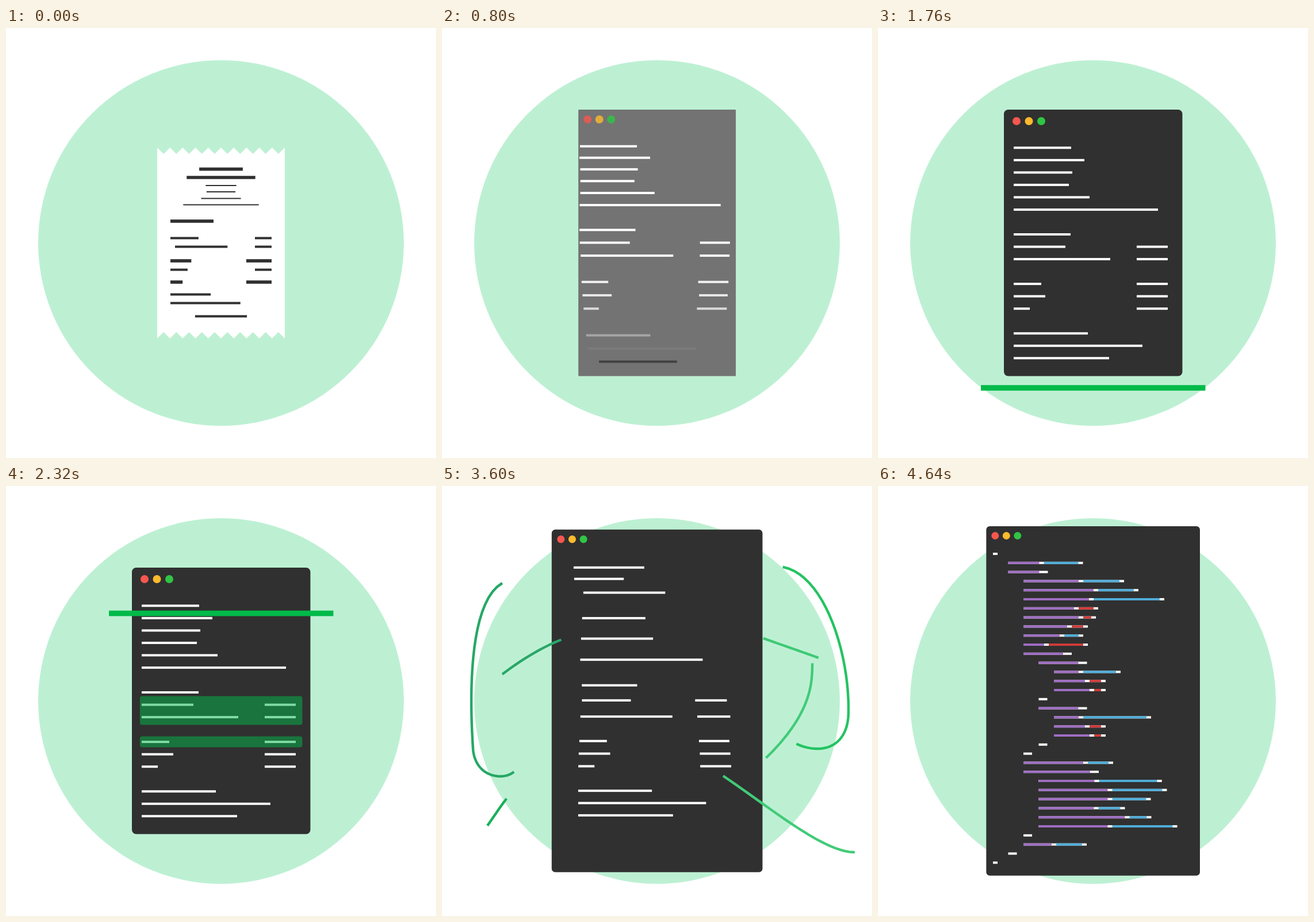
Recreate the animation shown at these times as an HTML page. Size 748 by 748 pixels, loop 5520 ms.

```html
<!DOCTYPE html>
<html lang="en">
<head>
<meta charset="utf-8">
<title>Receipt to code</title>
<style>
  html, body { margin: 0; width: 100%; height: 100%; overflow: hidden; background: #fff; }
  svg { display: block; width: 100vw; height: 100vh; }
</style>
</head>
<body>
<svg id="stage" viewBox="0 0 748 748"></svg>
<script>
const LOOP = 5520, STEP = 80;
const DARK = [48, 48, 48], WHITE = [255, 255, 255], GREEN = [2, 186, 74];
const PURPLE = [158, 109, 194], BLUE = [79, 172, 216], RED = [208, 58, 58];
const DOTS = ['#f4574f', '#fdba2d', '#30c544'];

const lerp = (a, b, p) => a + (b - a) * p;
const mix = (a, b, p) => a.map((v, i) => lerp(v, b[i], p));
const ramp = (t, a, b) => Math.min(1, Math.max(0, (t - a) / (b - a)));
const sine = p => (1 - Math.cos(Math.PI * p)) / 2;
const cubic = p => p < .5 ? 4 * p ** 3 : 1 - 4 * (1 - p) ** 3;
const rgb = c => `rgb(${c.map(Math.round)})`;
const n = v => v.toFixed(2);

// Piecewise linear value through [time, value] keys
function track(t, keys) {
  return keys.reduce((v, [at, next], i) => i ? lerp(v, next, ramp(t, keys[i - 1][0], at)) : next, 0);
}

const rect = (x, y, w, h, fill, rx = 0, alpha = 1) =>
  `<rect x="${n(x)}" y="${n(y)}" width="${n(Math.max(0, w))}" height="${n(h)}" rx="${n(rx)}" fill="${fill}" opacity="${n(alpha)}"/>`;
const bar = (x0, x1, y, fill, h = 4) => rect(x0, y - h / 2, x1 - x0, h, fill);

// Code listing as a tree of [key width, value width or children]; negative values are numbers
const item = name => [69, [[43, name], [54, -20], [62, -12]]];
const listing = [
  [54, 60],
  [54, [
    [96, 63], [122, 62], [114, 115], [88, -26], [96, -14], [76, -20], [63, 25], [36, -60],
    [69, [item(57), item(110)]],
    [104, 36],
    [116, [[97, 101], [120, 87], [120, 59], [96, 38], [150, 30], [120, 105]]],
    [49, 45]
  ]]
];
const rows = [];
function addRow(level, key, rest, color = BLUE) {
  const x0 = 200 + 26.5 * level;
  rows.push({ x0, key: x0 + key, x1: x0 + key + rest, y: 118 + 15.8 * rows.length, color });
}
function addRows(level, nodes) {
  for (const [key, value] of nodes) {
    if (Array.isArray(value)) {
      addRow(level, key, 15);
      addRows(level + 1, value);
      addRow(level, 0, 15);
    } else addRow(level, key, Math.abs(value) + 16, value < 0 ? RED : BLUE);
  }
}
addRow(0, 0, 8);
addRows(1, listing);
addRow(0, 0, 8);

// Receipt text: type style gives thickness and how much wider the line is in the window
const type = { h: [5.5, 1.03], b: [5.7, 1.32], t: [2, 1.91], n: [4, 1.84] };
const styles = 'bhttttbnnbnbnnn', aligns = 'ccccccllilllllc';
const widths = [100, 123, 102, 96, 132, 251, 99, 90, 168, 48, 55, 28, 129, 224, 166];
const paperY = [245.5, 260, 274, 285, 296.5, 307.5, 336, 365.5, 380.5, 405, 420.5, 442, 463.5, 478.5, 501.5];
const goals = [1, 2, 3, 6, 8, 11, 12, 13, 18, 19, 20, 25, 26, 27, 28];

const lines = widths.map((w, i) => {
  const [thick, grow] = type[styles[i]], small = w / grow;
  const x = { c: 374 - small / 2, l: 286, i: 294 }[aligns[i]];
  const slot = i + (i > 5) + (i > 8) + (i > 11);
  const row = rows[goals[i]], priced = i > 6 && i < 12;
  const line = { i, slot, thick, row, y: paperY[i], paper: [x, x + small], seat: [236, 236 + w],
    end: [row.x0, priced ? row.key : row.x1] };
  if (priced) line.price = { ...line, paper: [thick > 5 ? 418 : 433, 462], seat: [450, 504],
    end: [row.key + 4, row.x1] };
  return line;
});

// Ribbons: a chain of cubic curves, the row they feed and the side they enter
const ribbons = [
  { row: 4, side: 0, grow: 4040, first: 3, color: [143, 112, 179],
    path: `236,444 222,444 209,444 196,444 140,444 146,505 102,505 73,505 56,484 54,458
      51,410 34,153 134,163 165,166 205,177 242,181 246,181 250,181 254,181` },
  { row: 10, side: 1, grow: 4160, first: 3, color: [139, 220, 170],
    path: `418,389 450,389 480,389 510,389 570,389 590,457 653,457 685,457 706,435 707,396
      710,280 654,119 564,142 525,152 512,225 465,252 430,272 400,276 366,276` },
  { row: 25, side: 1, grow: 3973, first: 1, color: WHITE,
    path: '519,209 620,209 651,250 643,335 638,390 600,440 553,483 535,500 515,513 492,513' },
  { row: 23, side: 1, grow: 3957, first: 1, color: WHITE,
    path: '727,637 724,637 720,637 717,637 660,637 560,550 475,495 458,484 435,481 409,481' },
  { row: 5, side: 0, grow: 4230, first: 0, color: [95, 144, 136],
    path: '40,640 70,610 100,556 119,536 148,505 150,380 172,295 185,245 215,197 254,197' },
  { row: 7, side: 1, grow: 4030, first: 0, color: [240, 246, 243],
    path: '736,330 690,310 600,280 537,257 490,240 440,230 394,229 389,229 384,229 380,229' },
  { row: 9, side: 0, grow: 3904, first: 0, color: PURPLE,
    path: '26,400 80,340 150,290 206,268 225,261 240,260 254,260' }
];
for (const r of ribbons) {
  r.pts = r.path.trim().split(/\s+/).map(p => p.split(',').map(Number));
  r.end = (r.pts.length - 1) / 3;
}

// Rows without a line or ribbon simply extend from the left
const fed = new Set([...goals, ...ribbons.map(r => r.row)]);

function curveAt(pts, u) {
  const i = Math.min((pts.length - 4) / 3, Math.floor(u)), f = u - i, g = 1 - f;
  const [a, b, c, d] = pts.slice(3 * i, 3 * i + 4);
  return a.map((v, k) => g ** 3 * v + 3 * g * g * f * b[k] + 3 * g * f * f * c[k] + f ** 3 * d[k]);
}

function ribbon(r, t) {
  const landed = r.grow < 4000, rest = r.end - (landed ? 1 : 2);
  const arrive = landed ? [[r.grow, r.end]] : [[4000, rest + 1], [r.grow, r.end]];
  const head = track(t, [[2960, 0], [3280, r.first], ...arrive]);
  const tail = track(t, [[3280, 0], [4000, rest], [r.grow + 320, r.end]]);
  if (head <= tail) return '';
  const count = Math.ceil((head - tail) * 24);
  const line = Array.from({ length: count + 1 }, (_, j) =>
    curveAt(r.pts, lerp(tail, head, j / count)).map(n).join());
  const color = rgb(mix(GREEN, r.color, ramp(t, 3500, 3900)));
  return `<polyline points="${line.join(' ')}" fill="none" stroke="${color}" stroke-width="4.4" stroke-linejoin="round"/>`;
}

// A code row squeezed into x0..x1; tint 0 is all white
function codeRow(row, x0, x1, y, tint = 1) {
  const at = x => lerp(x0, x1, (x - row.x0) / (row.x1 - row.x0));
  let out = bar(x0, x1, y, '#fff');
  if (row.key > row.x0) out += bar(x0, at(row.key), y, rgb(mix(WHITE, PURPLE, tint)));
  if (row.x1 - row.key > 16) out += bar(at(row.key + 8), at(row.x1 - 8), y, rgb(mix(WHITE, row.color, tint)));
  return out;
}

function body(t) {
  const tall = sine(ramp(t, 400, 800)), wide = sine(ramp(t, 600, 960)), big = cubic(ramp(t, 3120, 3780));
  const x0 = lerp(lerp(263, 219, wide), 188.3, big), x1 = lerp(lerp(485, 529.5, wide), 560, big);
  const y0 = lerp(lerp(208, 142, tall), 70, big), y1 = lerp(lerp(540, 605.5, tall), 677.7, big);
  const fill = rgb(mix(WHITE, DARK, sine(ramp(t, 570, 945))));
  let out;
  if (t < 800) {
    const amp = 11 * (1 - tall), pts = [];
    for (let i = 0; i <= 20; i++) pts.push([lerp(x0, x1, i / 20), y0 + (i % 2) * amp]);
    for (let i = 20; i >= 0; i--) pts.push([lerp(x0, x1, i / 20), y1 - (i % 2) * amp]);
    out = `<polygon points="${pts.map(p => p.map(n).join()).join(' ')}" fill="${fill}"/>`;
  } else {
    out = rect(x0, y0, x1 - x0, y1 - y0, fill, lerp(lerp(1, 7.5, ramp(t, 800, 960)), 6, big));
  }
  const seat = ramp(t, 800, 960), show = ramp(t, 640, 840);
  const dx = lerp(lerp(16, 22, seat), 15.5, big), dy = lerp(lerp(17, 20, seat), 16.5, big);
  const gap = lerp(lerp(20.5, 21.5, seat), 19.5, big);
  DOTS.forEach((c, i) => {
    out += `<circle cx="${n(x0 + dx + gap * i)}" cy="${n(y0 + dy)}" r="${n(lerp(7, 6.5, big))}" fill="${c}" opacity="${n(show)}"/>`;
  });
  return out;
}

// Pose of a text line: from paper to window, then on to its code row
function pose(line, t) {
  const { i, slot, row } = line, depth = slot / 17;
  const wave = 8 * Math.sin(Math.PI * (slot + 1.5) / 14.5) * (1 - ramp(t, 800, 960));
  const across = sine(ramp(t, 440, 853 + 225 * depth ** 3));
  const x = mix(line.paper, line.seat, across);
  const y = lerp(line.y, 208.3 + 21.53 * slot - wave, sine(ramp(t, 440, 800)));
  const squeeze = 1 - .007 * ramp(t, 3120, 3280);
  const start = [...x, y].map(v => 374 + (v - 374) * squeeze);
  const p = cubic(ramp(t, 3232 + 28 * i, 3832 + 28 * i));
  const out = mix(start, [...line.end, row.y], p);
  out[2] -= 300 * (p * (1 - p)) ** 2;
  return out;
}

function textLine(line, t) {
  const [x0, x1, y] = pose(line, t), right = line.price && pose(line.price, t);
  const tintAt = 3740 + 24 * goals[line.i];
  if (t > tintAt) return codeRow(line.row, x0, right ? right[1] : x1, y, ramp(t, tintAt, tintAt + 220));
  const fadeAt = 560 + 220 * (line.slot / 17) ** 6;
  const fill = rgb(mix(DARK, WHITE, ramp(t, fadeAt, fadeAt + 240)));
  const thick = lerp(line.thick, 4, ramp(t, 400, 800));
  return bar(x0, x1, y, fill, thick) + (right ? bar(...right, fill, thick) : '');
}

function highlights(t) {
  if (t < 2080 || t >= 3440) return '';
  const p = sine(ramp(t, 2880, 3280)), alpha = lerp(.5, 1, p);
  const box = (a, b, show) => {
    const [x, y, w, h] = mix(a, b, p);
    return rect(x, y, w, h, rgb(GREEN), Math.min(4, h / 4), alpha * show);
  };
  const top = t > 3280 ? '' : box([233, 365.5, 282.5, 50], [418, 387, 95, 4.4], ramp(t, 2160, 2320));
  const left = 144 * (1 - ramp(t, 3280, 3440));
  return top + box([233, 435.5, 282.5, 19], [236, 443, left, 2], ramp(t, 2080, 2240));
}

function scanner(t) {
  if (t < 960 || t >= 2640) return '';
  const p = sine(ramp(t, 920, 1760)) - sine(ramp(t, 1800, 2533));
  return bar(179, 569.5, lerp(124, 626, p), rgb(GREEN), 9.6);
}

function growingRows(t) {
  let out = '';
  rows.forEach((row, i) => {
    const g = ramp(t, 3820 + 18 * i, 4000 + 18 * i);
    if (!fed.has(i) && g > 0) out += codeRow(row, row.x0, lerp(row.x0, row.x1, g), row.y);
  });
  for (const r of ribbons) {
    const row = rows[r.row], g = ramp(t, r.grow, r.grow + 320);
    const reach = (row.x1 - row.x0) * g;
    if (g > 0) out += codeRow(row, r.side ? row.x1 - reach : row.x0, r.side ? row.x1 : row.x0 + reach, row.y);
  }
  return out;
}

function scene(t) {
  return '<circle cx="374" cy="374" r="318" fill="#bdf0d3"/>' + body(t) +
    lines.map(line => textLine(line, t)).join('') + highlights(t) + scanner(t) +
    ribbons.map(r => ribbon(r, t)).join('') + growingRows(t);
}

const stage = document.getElementById('stage');
const begin = performance.now();
let shown = -1;
function tick() {
  const t = Math.floor(((performance.now() - begin) % LOOP) / STEP) * STEP;
  if (t !== shown) stage.innerHTML = scene(shown = t);
  requestAnimationFrame(tick);
}
tick();
</script>
</body>
</html>
```
